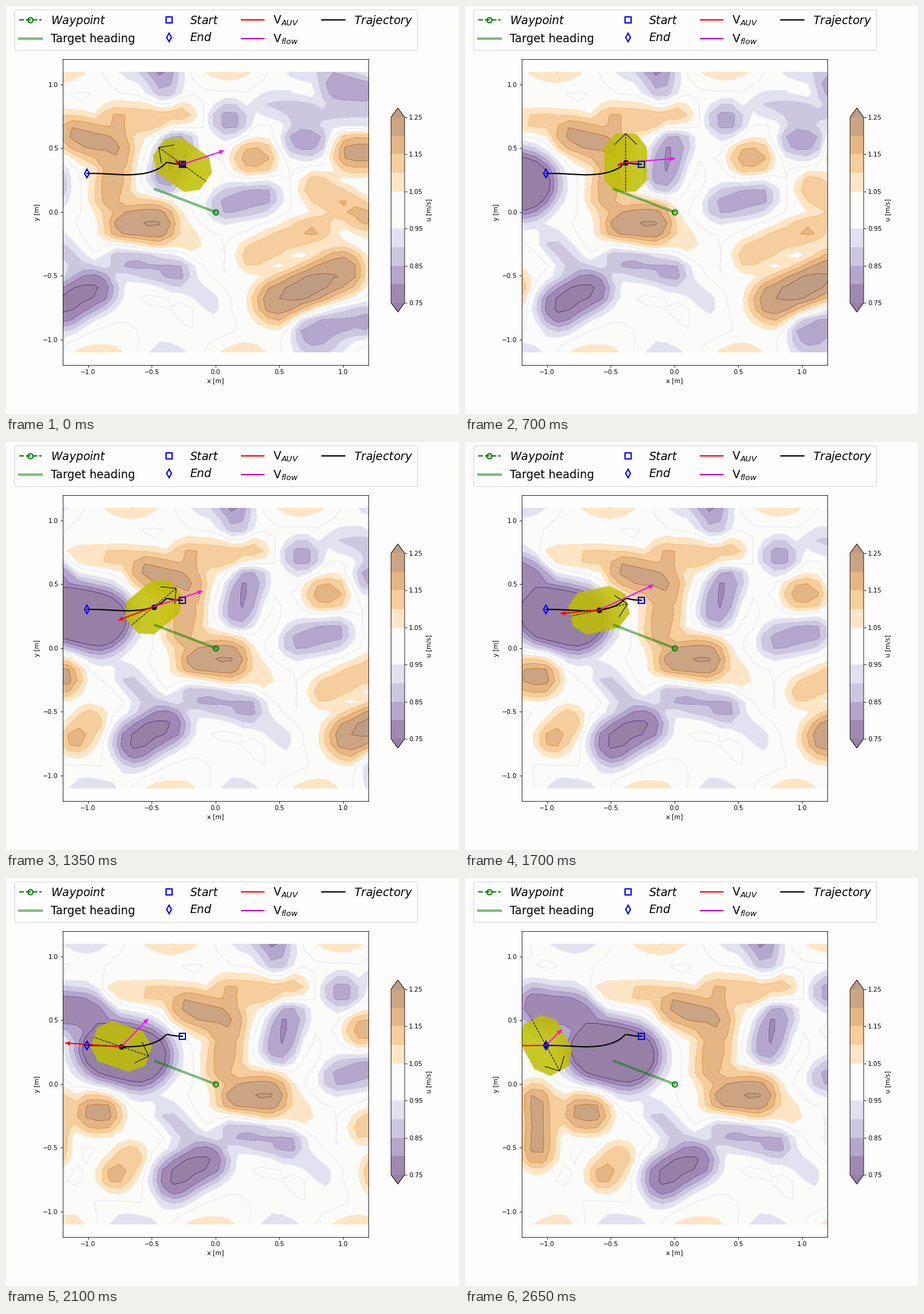
A matplotlib script for the animation above (2.7 s loop, 750 by 675 pixels).

```python
import numpy as np
import matplotlib.pyplot as plt
from matplotlib.animation import FuncAnimation
from matplotlib.cm import ScalarMappable
from matplotlib.colors import BoundaryNorm, ListedColormap

W, H, DPI = 750, 675, 75
FRAMES, STEP = 54, 50
UNIT = 506.25 / 2.4         # pixels per metre
ORIGIN = 346.875, 340.875
DRIFT = 4.42                # flow speed, pixels per frame
LEVELS = np.linspace(0.75, 1.25, 11)

# Main eddies as strokes in the drifting frame: x0, y0, x1, y1, peak in percent
FAST = [
    (115, 212, 180, 235, 22), (183, 250, 172, 320, 18), (-10, 190, 90, 191, 11),
    (180, 188, 285, 184, 15), (200, 362, 250, 358, 25), (265, 335, 305, 390, 10),
    (402, 250, 422, 250, 17), (570, 242, 610, 242, 21), (515, 303, 592, 350, 16),
    (405, 413, 520, 365, 14), (450, 488, 555, 438, 26), (-115, 370, -115, 450, 20),
    (-45, 388, -28, 388, 22), (20, 462, -5, 492, 16),
]
SLOW = [
    (262, 105, 264, 142, 15), (365, 187, 376, 187, 17), (430, 165, 600, 185, 11),
    (490, 220, 505, 222, 19), (550, 138, 600, 140, 19), (284, 226, 265, 282, 19),
    (362, 330, 425, 316, 17), (-15, 284, 35, 294, 40), (-115, 213, -40, 225, 25),
    (95, 498, 145, 468, 26), (80, 390, 125, 435, 11), (190, 414, 282, 443, 16),
    (290, 450, 340, 490, 8), (500, 535, 595, 522, 17),
]

# Vehicle key frames: place, velocity and flow arrow in pixels
KEYS = np.array([0, 7, 14, 21, 34, 42, 53])
PLACE = np.array([(292, 262), (279, 261), (266, 259), (259, 265),
                  (222, 278), (191, 279), (134, 277)], float)
SPEED = np.array([(-13, -6), (-47, -7), (-15, 5), (-32, 26),
                  (-65, 6), (-94, -6), (-110, 1)]) / 20
FLOW = np.array([(70, -23), (67, -14), (83, -7), (74, -13),
                 (91, -42), (45, -47), (27, -27)])
HALF_HULL = np.array([(48, 17), (25, 35.5), (-29, 35.5), (-48, 17)])
HULL = np.vstack([HALF_HULL, HALF_HULL[::-1] * (1, -1)])


def to_data(p):
    """Stage pixels to metres."""
    return (np.asarray(p, float) - ORIGIN) * (1, -1) / UNIT


def track(k):
    """Place and velocity on a cubic through the key frames."""
    k = np.atleast_1d(k).astype(float)
    i = np.clip(np.searchsorted(KEYS, k, "right") - 1, 0, len(KEYS) - 2)
    h = (KEYS[i + 1] - KEYS[i])[:, None]
    t = (k - KEYS[i])[:, None] / h
    p, q, u, v = PLACE[i], PLACE[i + 1], SPEED[i] * h, SPEED[i + 1] * h
    a, b = 2 * (p - q) + u + v, 3 * (q - p) - 2 * u - v
    return ((a * t + b) * t + u) * t + p, ((3 * a * t + 2 * b) * t + u) / h


def merge(strokes, x, y):
    """Smooth union of flat-topped ridges; stronger ones are wider."""
    total = 0
    for x0, y0, x1, y1, peak in strokes:
        dx, dy = x1 - x0, y1 - y0
        t = np.clip(((x - x0) * dx + (y - y0) * dy) / (dx * dx + dy * dy), 0, 1)
        gap = np.hypot(x - x0 - t * dx, y - y0 - t * dy)
        total = total + (peak * 2 ** -(gap / (10 + peak)) ** 3) ** 6
    return total ** (1 / 6)


def edge_wave(x, y, crest, period, row):
    """Row of weak patches along an edge, fast and slow in turn."""
    return 9 * np.cos(2 * np.pi * (x - crest) / period) * np.exp(-((y - row) / 24) ** 2)


def ripple(x, y):
    rng = np.random.default_rng(4)
    return sum(0.4 * np.sin(a * x + b * y + c)
               for a, b, c in rng.uniform(-1, 1, (8, 3)) * (0.08, 0.08, np.pi))


GX, GY = np.meshgrid(np.arange(-160, 640, 18), np.linspace(109, 573, 27))
FIELD = 1 + (merge(FAST, GX, GY) - merge(SLOW, GX, GY) + ripple(GX, GY)
             + edge_wave(GX, GY, 85, 280, 106)
             + edge_wave(GX, GY, 150, 245, 575)) / 100

puor = plt.get_cmap("PuOr_r")
shade_at = np.r_[0, np.arange(0.05, 1, 0.1), 1]
shade_at[5:7] = 0.5         # one neutral band around the mean
tints = 1 - 0.5 * (1 - puor(shade_at)[:, :3])
shades = ListedColormap(tints[1:-1])
shades.set_extremes(under=tints[0], over=tints[-1])
norm = BoundaryNorm(LEVELS, 10)
line_colors = puor(np.linspace(0, 1, 11))
line_colors[5] = puor(0.4)

fig = plt.figure(figsize=(W / DPI, H / DPI), dpi=DPI, facecolor="#fdfdfd")
ax = fig.add_axes([0.125, 0.12, 0.675, 0.75])
ax.set(xlim=(-1.2, 1.2), ylim=(-1.2, 1.2), xlabel="x [m]", ylabel="y [m]",
       xticks=np.arange(-1, 1.1, 0.5), yticks=np.arange(-1, 1.1, 0.5))
ax.set_facecolor("#fefefe")

bar = fig.colorbar(ScalarMappable(norm, shades), extend="both",
                   cax=fig.add_axes([0.85, 0.25, 0.03, 0.5]),
                   ticks=LEVELS[::2], format="%.2f")
bar.minorticks_off()
bar.set_label("u [m/s]")

# Fixed marks
heading = to_data([(347, 341), (247, 303)])
ax.plot(*heading.T, color="g", lw=4, alpha=0.5, zorder=2.5)
path = to_data(track(np.linspace(0, 53, 200))[0])
ax.plot(*path.T, color="k", lw=2, zorder=3)
ring = dict(marker="o", mec="g", mfc="none", ms=8, mew=2)
square = dict(marker="s", mec="b", mfc="none", ms=10, mew=2, ls="none")
diamond = dict(square, marker="d")
ax.plot(0, 0, zorder=6, **ring)
ax.plot(*path[0], zorder=6, **square)
ax.plot(*path[-1], zorder=6, **diamond)


def sample(label, **style):
    return plt.Line2D([], [], label=label, **style)


fig.legend(
    handles=[
        sample("$Waypoint$", color="g", ls="--", lw=2, **ring),
        sample("Target heading", color="g", lw=4, alpha=0.5),
        sample("$Start$", **square),
        sample("$End$", **diamond),
        sample("V$_{AUV}$", color="r", lw=2),
        sample("V$_{flow}$", color="m", lw=2),
        sample("$Trajectory$", color="k", lw=2),
    ],
    ncol=4, fontsize=18, loc="upper left", borderaxespad=0,
    bbox_to_anchor=(14 / W, 1 - 5.5 / H))

# Moving marks
hull = ax.add_patch(plt.Polygon(HULL, fc="y", ec="none", alpha=0.85, zorder=2))
keel, = ax.plot([], [], "k--", lw=1, zorder=3.2)
barbs, = ax.plot([], [], "k-", lw=1, zorder=3.2)
dot, = ax.plot([], [], "ko", ms=8, zorder=3.5)


def arrow(color, z):
    return ax.quiver([0], [0], [1], [1], color=color, angles="xy",
                     scale_units="xy", scale=1, width=2 / 506, headwidth=3.6,
                     headlength=4.5, headaxislength=4.5, minlength=0, zorder=z)


thrust, flow = arrow("red", 4), arrow("magenta", 4.1)
contours = []


def draw_field(k):
    while contours:
        contours.pop().remove()
    x, y = np.moveaxis(to_data(np.stack([GX + DRIFT * k, GY], -1)), -1, 0)
    contours.append(ax.contourf(x, y, FIELD, LEVELS, cmap=shades, norm=norm,
                                extend="both", zorder=1))
    contours.append(ax.contour(x, y, FIELD, LEVELS, colors=line_colors,
                               linewidths=0.7, alpha=0.8, zorder=1.1))


def update(k):
    draw_field(k)
    place, speed = (v[0] for v in track(k))
    here = to_data(place)
    a = np.radians(144.4 - 3.887 * k)
    turn = np.array([(np.cos(a), np.sin(a)), (-np.sin(a), np.cos(a))])

    def pose(points):
        return here + np.array(points) @ turn / UNIT

    hull.set_xy(pose(HULL))
    keel.set_data(*pose([(48, 0), (-48, 0)]).T)
    barbs.set_data(*pose([(30, 18), (48, 0), (30, -18)]).T)
    dot.set_data(*here[:, None])
    stream = [np.interp(k, KEYS, c) for c in FLOW.T]
    for q, (dx, dy) in ((thrust, speed * 20), (flow, stream)):
        q.set_offsets([here])
        q.XY = here[None]
        q.set_UVC([dx / UNIT], [-dy / UNIT])


anim = FuncAnimation(fig, update, frames=FRAMES, interval=STEP,
                     repeat=True, repeat_delay=0)
plt.show()
```
